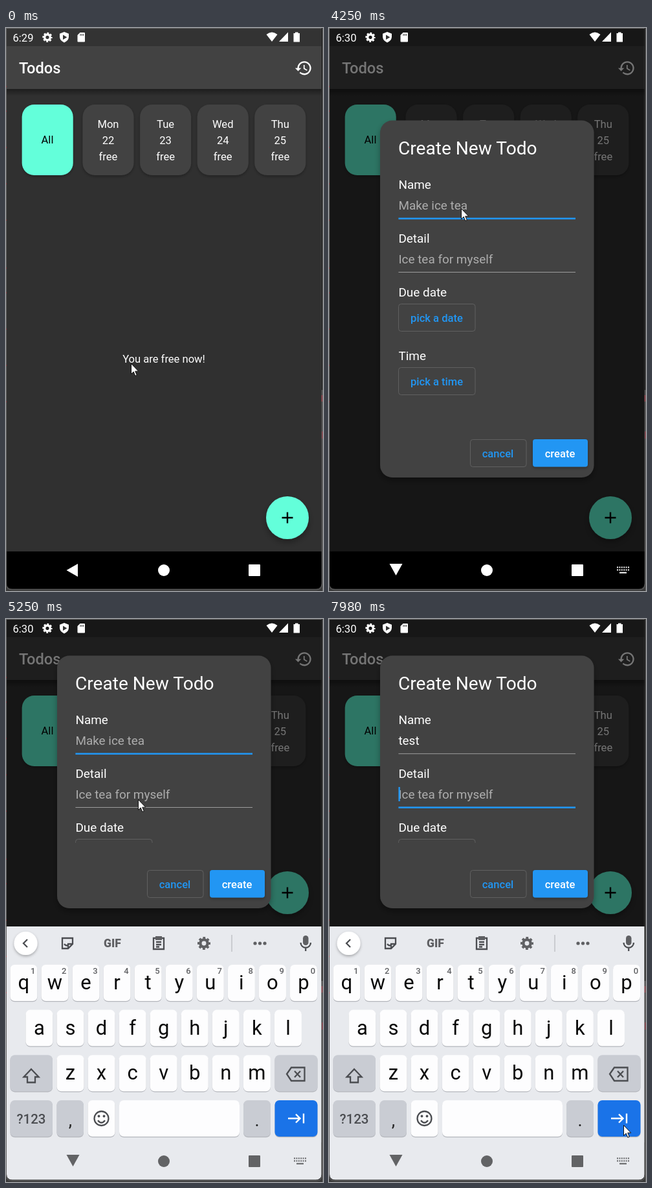
An HTML page that plays this animation: 490 px wide and 868 px high, repeating every 8000 ms.

```html
<!DOCTYPE html>
<html lang="en">
<head>
<meta charset="utf-8">
<title>Todo app</title>
<style>
html, body { margin: 0; width: 100%; height: 100%; overflow: hidden; background: #3a3a3a; }
svg { display: block; width: 490px; height: 868px; font: 16.57px Roboto, sans-serif; }
.mid { text-anchor: middle; }
.med { font-weight: 500; }
.label { font-size: 18.93px; fill: #fff; }
.hint { font-size: 18.93px; fill: #adadad; }
.blue { fill: #2196f3; }
.box { fill: none; stroke: #606060; }
.ink { fill: #5f6063; }
.line { fill: none; stroke: #4b4d51; stroke-width: 2.3; }
</style>
</head>
<body>
<svg viewBox="0 0 490 868">
  <defs>
    <clipPath id="screen"><path d="M1 1H487.500V856Q487.500 864.500 479 864.500H9.500Q1 864.500 1 856Z"/></clipPath>
    <clipPath id="scrollArea"><rect id="scrollRect" x="79" y="200" width="330" height="392"/></clipPath>
    <linearGradient id="fade" x2="0" y2="1"><stop stop-opacity=".38"/><stop offset="1" stop-opacity="0"/></linearGradient>
    <filter id="soft" x="-30%" y="-30%" width="160%" height="160%"><feDropShadow dx="0" dy="2" stdDeviation="2" flood-opacity=".3"/></filter>
    <filter id="deep" x="-30%" y="-30%" width="160%" height="160%"><feDropShadow dx="0" dy="5" stdDeviation="5" flood-opacity=".32"/></filter>
    <g id="gear" fill="none" stroke="currentColor">
      <circle r="4.900" stroke-width="3.800"/>
      <circle r="7.300" stroke-width="2.800" stroke-dasharray="3.200 2.533" stroke-dashoffset="1.600"/>
    </g>
  </defs>

  <rect width="490" height="868" fill="#3a3a3a"/>
  <path d="M.5 0V858Q.5 866 9 866H480Q488 866 488 858V0M0 .5H490" fill="none" stroke="#646464"/>
  <path d="M488.500 0V558" stroke="#111"/>
  <path d="M489.500 0V868" stroke="#666"/>
  <g id="ticks" fill="#a84350"></g>

  <g clip-path="url(#screen)">
    <rect width="490" height="868" fill="#303030"/>
    <rect width="490" height="94" fill="#424242"/>
    <rect width="490" height="28" fill="#333"/>
    <rect y="94" width="490" height="11" fill="url(#fade)"/>
    <text x="20" y="70" class="med" font-size="23.670" fill="#fff">Todos</text>
    <path transform="translate(445.700 47.600) scale(1.183)" fill="#fff" d="M13 3a9 9 0 0 0-9 9H1l3.890 3.890.070.140L9 12H6a7 7 0 1 1 2.060 4.940l-1.420 1.420A9 9 0 1 0 13 3zm-1 5v5l4.280 2.540.720-1.210-3.500-2.080V8z"/>
    <g id="cards" class="mid"></g>
    <text x="244" y="515.700" class="mid" fill="#fff">You are free now!</text>
    <g id="fab">
      <circle cx="435" cy="755" r="33" fill="#64ffda" filter="url(#deep)"/>
      <path d="M426.500 755H443.500M435 746.500V763.500" stroke="#000" stroke-width="2.400"/>
    </g>
    <rect id="scrim" width="490" height="868"/>
    <rect y="807" width="490" height="61"/>

    <g id="dialog">
      <rect id="panel" x="79" width="330.500" rx="19" fill="#424242" filter="url(#deep)"/>
      <g id="content">
        <text x="107" y="195" font-size="28.100" fill="#fff">Create New Todo</text>
      </g>
      <g clip-path="url(#scrollArea)">
        <g id="form">
          <text x="107.400" y="247.500" class="label">Name</text>
          <text id="name" x="107.400" y="279.500"></text>
          <rect id="compose" x="107.400" y="281.500" width="32" height="1.200" fill="#fff"/>
          <rect id="nameLine" x="107.400" width="273.600"/>
          <text x="107.400" y="330.500" class="label">Detail</text>
          <text x="107.400" y="362.500" class="hint">Ice tea for myself</text>
          <rect id="detailLine" x="107.400" width="273.600"/>
          <rect id="caret" width="2.400" height="22" class="blue"/>
          <text x="107.400" y="413.500" class="label">Due date</text>
          <rect x="107.500" y="425.500" width="118.500" height="42" rx="4" class="box"/>
          <text x="166.500" y="452.500" class="mid med blue">pick a date</text>
          <text x="107.400" y="511.500" class="label">Time</text>
          <rect x="107.500" y="523.500" width="118.500" height="42" rx="4" class="box"/>
          <text x="166.500" y="550.500" class="mid med blue">pick a time</text>
        </g>
      </g>
      <g id="actions" class="mid med">
        <rect x="218.500" y="634.500" width="86.500" height="42" rx="4" class="box"/>
        <text x="261" y="661.500" class="blue">cancel</text>
        <rect x="315" y="634" width="85" height="42.500" rx="4" class="blue" filter="url(#soft)"/>
        <text x="357" y="661.500" fill="#fff">create</text>
      </g>
    </g>

    <g id="keyboard">
      <rect width="490" height="400" fill="#e8eaee"/>
      <circle cx="30.500" cy="26" r="18" fill="#fff" filter="url(#soft)"/>
      <path id="chevron" class="line"/>
      <g id="tools" class="ink">
        <path class="line" d="M87 18H103V27L96 34H87ZM103 27H96V34M91 23h.1M98 23h.1M90 27q3 4 6 1" stroke-width="2"/>
        <text x="164.500" y="31.500" class="mid" font-size="17.500" font-weight="900">GIF</text>
        <path class="line" d="M228 18H244V35H228ZM232 24H240M232 28H240M232 31.500H237" stroke-width="2"/>
        <path d="M231 15H241V21H231Z"/>
        <use href="#gear" transform="translate(306 26) scale(1.150)" color="#5f6063"/>
        <path d="M349 13V39" stroke="#c0c2c6" stroke-width="1.500"/>
        <circle cx="385" cy="26" r="2.600"/><circle cx="392.500" cy="26" r="2.600"/><circle cx="400" cy="26" r="2.600"/>
      </g>
      <g id="words" class="mid" font-size="20.700" fill="#3f4145">
        <text x="108.500" y="33.500">test</text><text x="242" y="33.500">tested</text><text x="376.500" y="33.500">testing</text>
        <path d="M172 12V40M314 12V40" stroke="#c4c6ca" stroke-width="1.500"/>
      </g>
      <rect x="459" y="14" width="8.500" height="15" rx="4.250" class="ink"/>
      <path class="line" d="M455.500 25A7.700 7.700 0 0 0 471 25M463.200 33V38"/>
      <g id="keys" class="mid"></g>
      <g class="line">
        <path d="M39 220L50.500 232H45V240.500H33V232H27.500Z"/>
        <path d="M434 227.500L441 217.500H461.500V238H441ZM446 223L455 232.500M455 223L446 232.500"/>
        <circle cx="147.500" cy="296" r="11"/>
        <path d="M142 299Q147.500 306 153 299"/>
      </g>
      <g fill="#4b4d51"><circle cx="143.500" cy="292.500" r="1.900"/><circle cx="151.500" cy="292.500" r="1.900"/></g>
      <path d="M436 296H454M448 289.500L454.500 296L448 302.500M460 288.500V303.500" fill="none" stroke="#fff" stroke-width="2.400"/>
    </g>

    <g id="nav">
      <path id="back"/>
      <circle cx="244" cy="836" r="9"/>
      <rect x="375" y="827" width="18" height="18" rx="1"/>
      <g id="imeIcon" fill="none" stroke="currentColor" stroke-width="2">
        <path d="M445 831.500H464M445 835.500H464" stroke-dasharray="2 1.400"/>
        <path d="M449 839.800H460"/>
      </g>
    </g>
    <g fill="#fff">
      <text id="clock" x="10.500" y="20.500"></text>
      <use href="#gear" transform="translate(64 14.300) scale(.880)" color="#fff"/>
      <path d="M90 6L97 8.700V14Q96.500 19.500 90 22.500Q83.500 19.500 83 14V8.700Z"/>
      <path d="M88 10.500V18L94.300 14.200Z" fill="#333"/>
      <path d="M114.500 7H121Q122 7 122 8V20.500Q122 21.500 121 21.500H111.500Q110.500 21.500 110.500 20.500V11Z"/>
      <path d="M115 9V12M117.300 9V12M119.600 9V12" stroke="#333"/>
      <path d="M402.500 10Q411 3 419.500 10L411 21Z"/>
      <path d="M436 6.500V21H422Z"/>
      <path d="M447 6.500H451.500V8H454V21.500H444.500V8H447Z"/>
    </g>
  </g>
  <path id="pointer" d="M.5.5V16.500L4.200 13L6.800 19.300L9.300 18.300L6.700 12.200H11.700Z" fill="#fff" stroke="#111"/>
</svg>

<script>
const $ = id => document.getElementById(id);
const set = (id, attrs) => { for (const k in attrs) $(id).setAttribute(k, attrs[k]); };
const show = (id, on) => set(id, { visibility: on ? 'visible' : 'hidden' });
const last = (steps, t) => steps.filter(s => s[0] <= t).pop();
const within = (t, spans) => spans.some(([a, b]) => t >= a && t < b);
const text = (x, y, s, attrs = '') => `<text x="${x}" y="${y}" ${attrs}>${s}</text>`;

const LOOP = 8000;

// time, x, y
const POINTER = [
  [0, 193, 517], [120, 196, 513], [240, 200, 508], [360, 204, 505],
  [510, 210, 508], [630, 219, 514], [750, 228, 517], [900, 238, 440],
  [1020, 253, 383], [1140, 257, 455], [1290, 277, 500], [1410, 307, 556],
  [1530, 341, 619], [1650, 400, 698], [1770, 437, 742], [1920, 447, 752],
  [2070, 442, 752], [2190, 437, 750], [2820, 395, 640], [2950, 315, 480],
  [3070, 252, 366], [3220, 234, 332], [3340, 214, 296], [3460, 204, 278],
  [5490, 206, 277], [5630, 212, 276], [5750, 221, 275], [5890, 262, 296],
  [6170, 313, 319], [6290, 348, 362], [6410, 371, 393], [6560, 369, 408],
  [6950, 365, 440], [7080, 387, 516], [7220, 420, 640], [7340, 448, 744],
  [7470, 461, 800], [7610, 458, 790], [7730, 455, 780]
];
// time, keyboard drop, dialog inset, button inset
const INSETS = [[0, 400, 0, 0], [4650, 165, 50, 165], [4770, 5.3, 235, 311], [4890, 0, 333, 333]];
const NAME = [[0, ''], [5630, 'te'], [5750, 'test']];
const SCRIM = [[0, 0, 0], [2430, .49, .84], [2550, .54, 1]];
const NAME_CARET = [[4010, 4250], [4770, 5130], [5630, 6290], [6810, 7340]];

function build() {
  $('ticks').innerHTML = [90, 128, 184, 240, 296, 370, 408, 464, 520, 576]
    .map(y => `<rect y="${y - .5}" width="1.2" height="1.5"/>`).join('') +
    '<rect x="488.5" y="622" width="1" height="11"/><rect x="487.5" y="566" width="1.5" height="10"/>';

  const card = (x, fill) => `<rect x="${x}" y="118" width="79" height="109" rx="19" fill="${fill}" filter="url(#soft)"/>`;
  $('cards').innerHTML = card(24.7, '#64ffda') + text(64, 178.3, 'All') +
    ['Mon', 'Tue', 'Wed', 'Thu'].map((day, i) => {
      const x = 118.5 + i * 88.6;
      return card(x, '#424242') + [day, 22 + i, 'free']
        .map((s, row) => text(x + 39.5, 153.5 + row * 25, s, 'fill="#fff"')).join('');
    }).join('');

  const key = (x, y, w, fill, id = '') =>
    `<rect x="${x}" y="${y + 1.2}" width="${w}" height="56" rx="7" fill="#b4b6bc"/>` +
    `<rect ${id} x="${x}" y="${y}" width="${w}" height="56" rx="7" fill="${fill}"/>`;
  const gray = '#c9ccd3', white = '#fdfdfe';
  let html = '';
  ['qwertyuiop', 'asdfghjkl', 'zxcvbnm'].forEach((row, r) => {
    const y = 59 + r * 69.6, first = [27.4, 51.4, 99.5][r];
    [...row].forEach((c, i) => {
      const x = first + i * 48.07;
      html += key(x - 21, y, 42, white) + text(x, y + 38, c, 'font-size="31" fill="#080808"');
      if (!r) html += text(x + 14.3, y + 14, (i + 1) % 10, 'font-size="13" class="med ink"');
    });
  });
  html += key(6.5, 198.2, 65.5, gray) + key(415.5, 198.2, 66, gray) +
    key(6.5, 268, 65.5, gray) + key(78.5, 268, 41.5, gray) + key(126.5, 268, 42, white) +
    key(175, 268, 186, white) + key(367, 268, 42, gray) +
    key(415.5, 268, 66, '#1a73e8', 'id="enter"') +
    text(39, 303.5, '?123', 'font-size="20.5" class="med" fill="#4b4d51"') +
    text(99.5, 308, ',', 'font-size="27" fill="#222"') +
    text(388, 308, '.', 'font-size="27" fill="#222"');
  $('keys').innerHTML = html;
}

function field(id, y, focused) {
  set(id, focused
    ? { y: y - 1.2, height: 2.6, fill: '#2196f3' }
    : { y: y - .5, height: 1, fill: '#9c9c9c' });
}

function draw(t) {
  const [, px, py] = last(POINTER, t);
  set('pointer', { transform: `translate(${px} ${py})` });
  $('clock').textContent = t < 630 ? '6:29' : '6:30';

  const [, dim, alpha] = last(SCRIM, t);
  set('scrim', { opacity: dim });
  set('dialog', { opacity: alpha });

  // The dialog rises until it meets the top margin, then shrinks.
  const [, drop, inset, lift] = last(INSETS, t);
  const rise = Math.min(inset, 172) / 2;
  const top = 142.5 - rise, bottom = 693 - inset + rise;
  set('panel', { y: top, height: bottom - top });
  set('scrollRect', { y: top + 70, height: bottom - 101 - top - 70 });
  for (const id of ['content', 'form']) set(id, { transform: `translate(0 ${-rise})` });
  set('actions', { transform: `translate(0 ${bottom - 693})` });
  set('fab', { transform: `translate(0 ${-lift})` });

  const name = last(NAME, t)[1], onDetail = t >= 7730;
  $('name').textContent = name || 'Make ice tea';
  set('name', { class: name ? 'label' : 'hint' });
  show('compose', t >= 5890 && !onDetail);
  field('nameLine', 293.7, t >= 4010 && !onDetail);
  field('detailLine', 376.5, onDetail);
  show('caret', onDetail || within(t, NAME_CARET));
  set('caret', onDetail
    ? { x: 107.4, y: 345 }
    : { x: 107.4 + [0, 0, 16.5, 0, 32][name.length], y: 262 });

  const typing = t >= 4650, words = within(t, [[5890, 7850]]);
  set('keyboard', { transform: `translate(0 ${474 + drop})` });
  show('keyboard', typing);
  show('tools', typing && !words);
  show('words', typing && words);
  set('chevron', { d: words ? 'M28 20L34 26L28 32' : 'M33 20L27 26L33 32' });
  set('enter', { fill: within(t, [[7610, 7850]]) ? '#1765cc' : '#1a73e8' });

  const ime = t >= 4250, tone = typing ? '#626365' : '#fff';
  set('nav', { fill: tone, color: tone });
  set('back', { d: ime ? 'M93.500 826H113.500L103.500 844Z' : 'M93.500 836L111 826V846Z' });
  show('imeIcon', ime);
}

build();
const start = performance.now();
function tick() {
  draw((performance.now() - start) % LOOP);
  requestAnimationFrame(tick);
}
tick();
</script>
</body>
</html>
```
